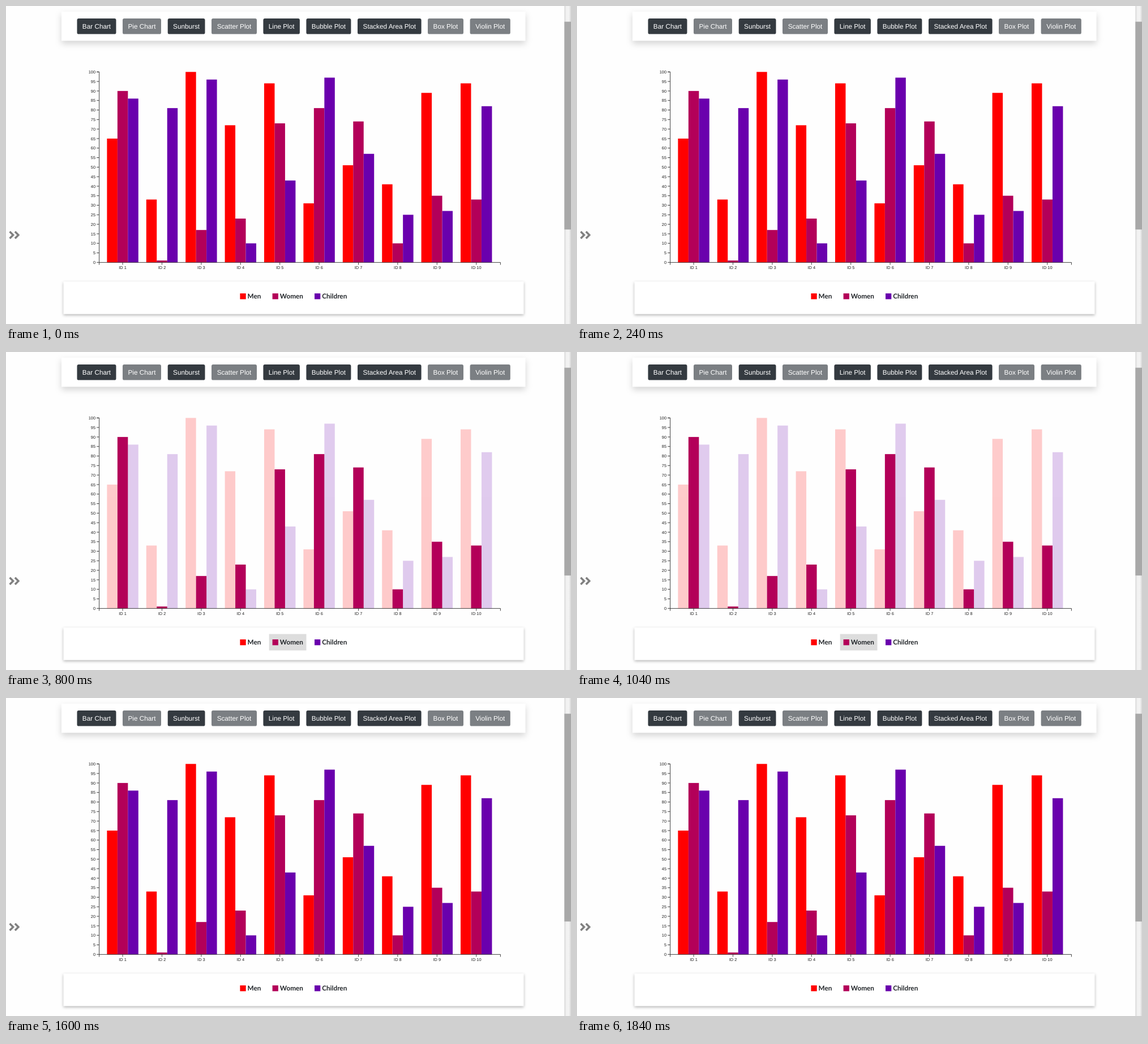
Animation of 998 by 561 pixels, one loop 2000 ms. Source, as an HTML page:

```html
<!DOCTYPE html>
<html lang="en">
<head>
<meta charset="utf-8">
<title>Grouped bar chart</title>
<style>
  html, body { margin: 0; width: 100%; height: 100%; overflow: hidden; background: #fefefe; }
  svg { display: block; width: 100vw; height: 100vh; }
  text { text-rendering: geometricPrecision; }
  .card { fill: #fff; }
  .top { filter: drop-shadow(0 5.9px 5.9px rgba(0, 0, 0, .17)); }
  .bottom { filter: drop-shadow(0 2.2px 2.6px rgba(0, 0, 0, .29)); }
  .button { font: 11.76px "Liberation Sans", Arial, sans-serif; fill: #fff; text-anchor: middle; }
  .axis { font: 7.4px "Liberation Sans", Arial, sans-serif; fill: #222; }
  .axis path { fill: none; stroke: #222; stroke-width: .85; }
  .legend { font: bold 11.76px Lato, sans-serif; fill: #212529; }
</style>
</head>
<body>
<svg id="stage" viewBox="0 0 998 561" preserveAspectRatio="none">
  <defs>
    <linearGradient id="track">
      <stop offset="0" stop-color="#d6d6d6"/>
      <stop offset=".3" stop-color="#f2f2f2"/>
      <stop offset=".7" stop-color="#f2f2f2"/>
      <stop offset="1" stop-color="#d6d6d6"/>
    </linearGradient>
  </defs>
</svg>
<script>
const SVG = "http://www.w3.org/2000/svg";
const LOOP = 2000, STEP = 400;
const stage = document.getElementById("stage");

const series = [
  { name: "Men", color: "#ff0000", x: 413.4, box: [407.6, 48.2],
    values: [65, 33, 100, 72, 94, 31, 51, 41, 89, 94] },
  { name: "Women", color: "#b30059", x: 470.6, box: [464.7, 65.8],
    values: [90, 1, 17, 23, 73, 81, 74, 10, 35, 33] },
  { name: "Children", color: "#6a00ad", x: 545, box: [539.1, 69.4],
    values: [86, 81, 96, 10, 43, 97, 57, 25, 27, 82] }
];
const buttons = [
  ["Bar Chart", 125.5, 69, 1], ["Pie Chart", 206, 68, 0], ["Sunburst", 285.7, 65.8, 1],
  ["Scatter Plot", 363, 80, 0], ["Line Plot", 454.4, 64.5, 1], ["Bubble Plot", 530.4, 79, 1],
  ["Stacked Area Plot", 621, 112.6, 1], ["Box Plot", 745, 63, 0], ["Violin Plot", 819.6, 71.2, 0]
];

function add(parent, tag, attrs = {}, text) {
  const node = document.createElementNS(SVG, tag);
  for (const key in attrs) node.setAttribute(key, attrs[key]);
  if (text !== undefined) node.textContent = text;
  parent.appendChild(node);
  return node;
}

const rect = (parent, x, y, width, height, attrs) =>
  add(parent, "rect", { x, y, width, height, ...attrs });

const scaleY = v => 452.3 - v * 3.36;
const groupX = i => 178.4 + i * 69.4;
const BAR = 18.47;

function drawFrame() {
  rect(stage, 98, 10, 819.5, 51.4, { class: "card top" });
  for (const [label, x, w, enabled] of buttons) {
    rect(stage, x, 22, w, 27.6, { rx: 2.9, fill: enabled ? "#343a40" : "#7b7f83" });
    add(stage, "text", { x: x + w / 2, y: 39.6, class: "button" }, label);
  }
  rect(stage, 101.5, 486, 813, 57.5, { class: "card bottom" });
  rect(stage, 986.3, 0, 11.7, 561, { fill: "url(#track)" });
  rect(stage, 986.3, 27.7, 11.7, 366.6, { fill: "#a8a8a8" });
  add(stage, "path", {
    d: "M6.6 398l6 6-6 6M15.9 398l6 6-6 6",
    fill: "none", stroke: "#808080", "stroke-width": 3.5
  });
}

function drawSeries() {
  const legend = add(stage, "g", { class: "legend" });
  series.forEach((s, k) => {
    s.bars = add(stage, "g", { fill: s.color });
    s.values.forEach((v, i) =>
      rect(s.bars, groupX(i) + k * BAR, scaleY(v), BAR, v * 3.36));
    s.hover = rect(legend, s.box[0], 497.5, s.box[1], 29, { fill: "#ddd" });
    rect(legend, s.x, 507, 10.3, 10.3, { fill: s.color });
    add(legend, "text", { x: s.x + 13.2, y: 516.2 }, s.name);
  });
}

function drawAxes() {
  const axis = add(stage, "g", { class: "axis" });
  let d = "M160.2 116.3H164.6V456.6M164.6 452.4H873.4V456.6";
  for (let v = 0; v <= 100; v += 5) {
    d += `M160.2 ${scaleY(v)}h4.4`;
    add(axis, "text", { x: 158, y: scaleY(v) + 2.7, "text-anchor": "end" }, v);
  }
  for (let i = 0; i < 10; i++) {
    const x = groupX(i) + BAR * 1.5;
    d += `M${x} 452.4v4.2`;
    add(axis, "text", { x, y: 463.8, "text-anchor": "middle" }, "ID " + (i + 1));
  }
  add(axis, "path", { d });
}

// Steps 1 to 3 highlight one series; the others show all.
function render(time) {
  const active = Math.floor((time % LOOP) / STEP) - 1;
  const all = !series[active];
  series.forEach((s, k) => {
    s.bars.setAttribute("opacity", all || k === active ? 1 : .2);
    s.hover.setAttribute("visibility", k === active ? "visible" : "hidden");
  });
}

drawFrame();
drawSeries();
drawAxes();

const start = performance.now();
function tick() {
  render(performance.now() - start);
  requestAnimationFrame(tick);
}
tick();
</script>
</body>
</html>
```
